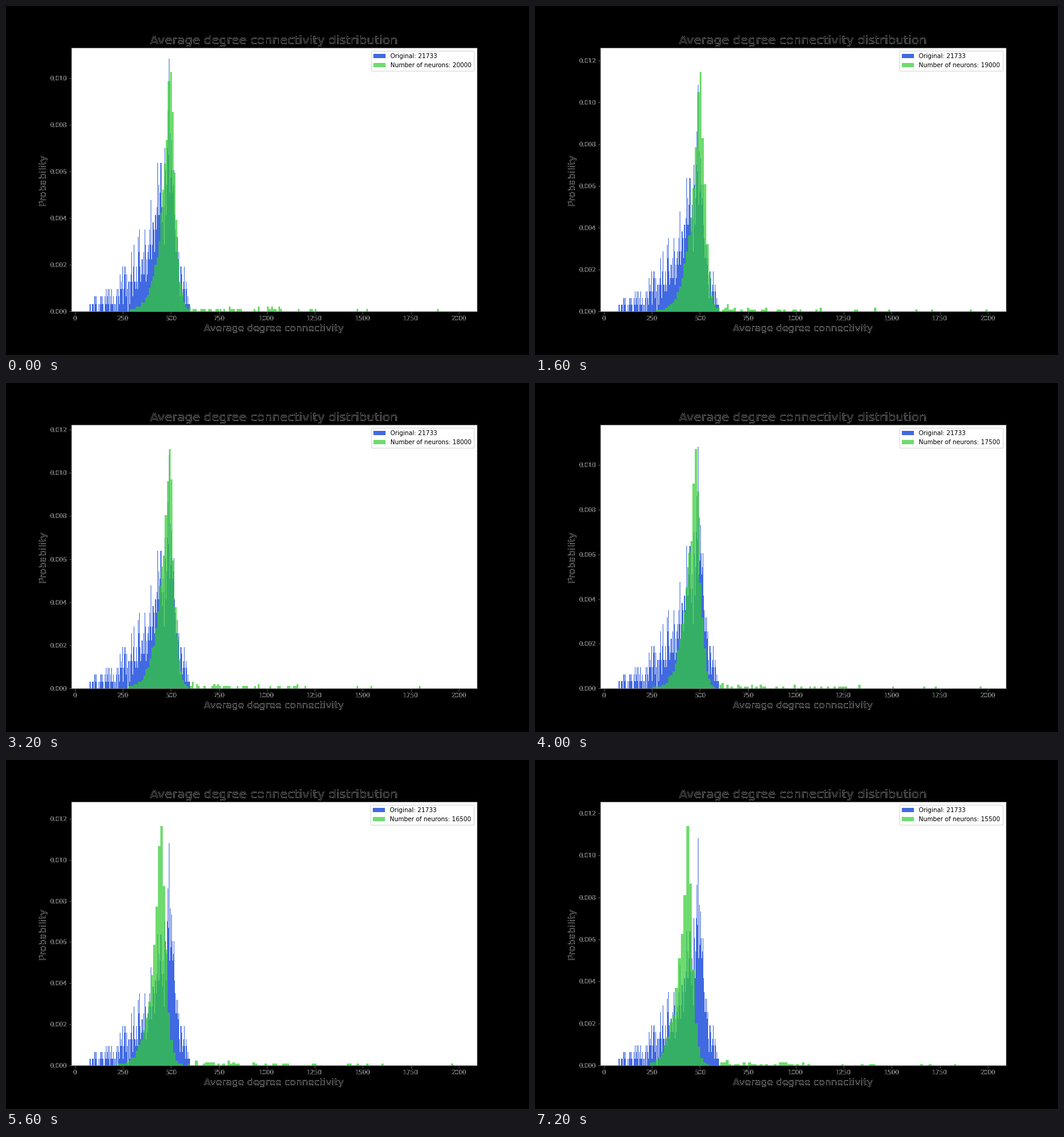
Animation, 864 px wide and 576 px high, one loop 8 s. Source, as a matplotlib script:

```python
import numpy as np
import matplotlib.pyplot as plt
from matplotlib.animation import FuncAnimation

BLUE, GREEN = "royalblue", "limegreen"
AXES_H = 434.88              # axes height in pixels
PX_ZERO, PX_UNIT = 113.8, 0.317
ITEMS = 1000                 # values in each histogram
REF_PEAK = 269

# Per step: bin width and left edge of the tallest bin (pixels), y limit.
WIDTHS = [3.15, 3.45, 3.75, 9.15, 3.2, 3.7, 4.25, 4.1, 4, 4.65]
PEAKS = [270.6, 271, 271.7, 267, 268.8, 264, 258, 255, 252, 250]
TOPS = [0.011296, 0.0118, 0.012605, 0.010982, 0.012222,
        0.0118, 0.011384, 0.01282, 0.013661, 0.012545]

plt.rcParams["font.family"] = "DejaVu Sans"
fig = plt.figure(figsize=(12, 8), dpi=72, facecolor="black")
fig.subplots_adjust(left=0.125, right=0.9, bottom=0.125, top=0.88)
ax = fig.add_subplot()


def to_x(px):
    return (np.asarray(px, float) - PX_ZERO) / PX_UNIT


def density(width):
    """Height of one item in a bin that is width pixels wide."""
    return PX_UNIT / (ITEMS * width)


def outline(img, dpi):
    """Keep black ink black and show only its soft edges in gray."""
    a = img[..., 3]
    out = np.zeros_like(img)
    out[..., :3] = (2 * a * (1 - a))[..., None]
    out[..., 3] = a > 0
    return out, 0, 0


def reference():
    """One-pixel bins: a skewed double exponential with counting noise."""
    rng = np.random.default_rng(4)
    px = np.arange(138, 304)
    scale = np.where(px < REF_PEAK, 33, 13)
    mean = 24 * np.exp(-np.abs(px - REF_PEAK) / scale)
    counts = np.minimum(rng.poisson(mean), 28)
    counts[px == REF_PEAK] = 34
    return px, counts * density(1) * 1.005


def sample(step):
    """Skewed peak plus a thin tail of scattered outliers."""
    rng = np.random.default_rng(step)
    width, peak, top = WIDTHS[step], PEAKS[step], TOPS[step]
    before, after = int((peak - 185) / width), int((765 - peak) / width)
    k = np.arange(-before, after)
    left = peak + k * width
    d = np.abs(k) * width
    shape = np.where(k < 0, np.exp(-(d / 17) ** 1.2),
                     np.exp(-(d / 9.5) ** 1.4))
    highest = top / 1.1
    noise = rng.uniform(0.88, 1.1, k.size)
    counts = np.rint(shape * noise * highest / density(width))
    tail = 302 + rng.exponential(120, 40)
    counts += np.histogram(tail, np.append(left, left[-1] + width))[0]
    height = np.minimum(counts * density(width), 0.96 * highest)
    height[k == 0] = highest
    return left, height


ref_px, ref_height = reference()


def draw(i):
    ax.clear()
    ax.bar(to_x(ref_px), ref_height, 1 / PX_UNIT, align="edge",
           color=BLUE, label="Original: 21733")
    left, height = sample(i)
    ax.bar(to_x(left), height, WIDTHS[i] / PX_UNIT, align="edge",
           color=GREEN, alpha=0.7,
           label=f"Number of neurons: {20000 - 500 * i}")
    ax.set_xlim(to_x(108), to_x(777.6))
    ax.set_ylim(0, TOPS[i])
    ax.set_xticks(range(0, 2001, 250))
    ax.set_yticks(np.arange(0, TOPS[i], 0.002))
    ax.yaxis.set_major_formatter("{x:.3f}")
    ax.set_title("Average degree connectivity distribution", fontsize=20)
    ax.set_xlabel("Average degree connectivity", fontsize=16)
    ax.set_ylabel("Probability", fontsize=16)
    ax.legend(loc="upper right")
    for part in (ax.title, ax.xaxis, ax.yaxis):
        part.set_agg_filter(outline)
    for spine in ax.spines.values():
        spine.set_color("gray")
    return []


anim = FuncAnimation(fig, draw, frames=len(WIDTHS), init_func=lambda: [],
                     interval=800, repeat=True, repeat_delay=0)
plt.show()
```
